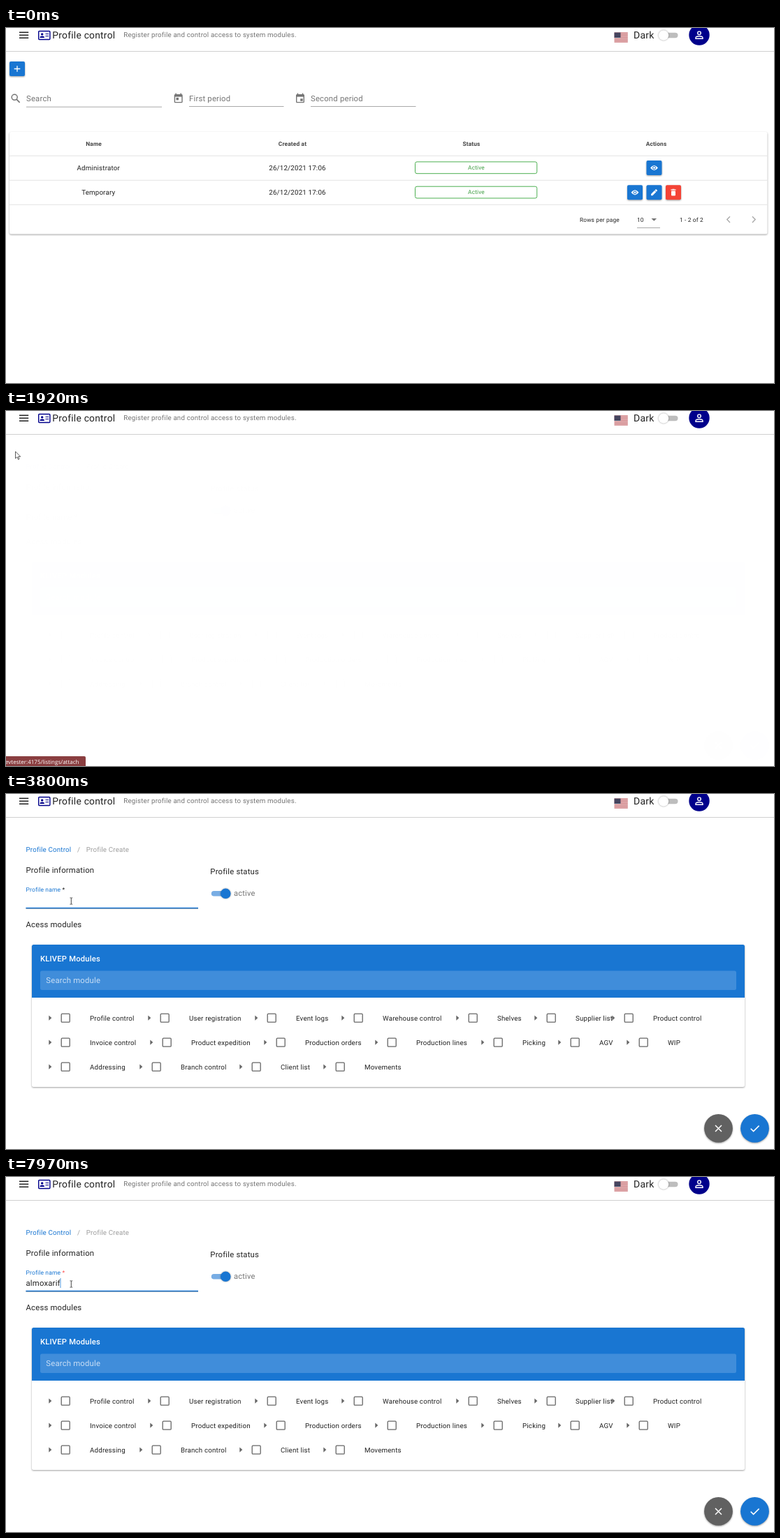
These frames come from a looping animation (1099 by 509 pixels, 8 s). An HTML page:

```html
<!DOCTYPE html>
<html lang="en">
<head>
<meta charset="utf-8">
<title>Profile control</title>
<style>
  html, body { margin: 0; width: 100%; height: 100%; overflow: hidden; background: #fff; }
  svg { display: block; font-family: Roboto, sans-serif; text-rendering: geometricPrecision; }
  text { letter-spacing: .018em; white-space: pre; }
  .card { filter: drop-shadow(0 1px 1.3px rgba(0, 0, 0, .38)); }
  .knob { filter: drop-shadow(0 .8px 1px rgba(0, 0, 0, .4)); }
</style>
</head>
<body>
<svg id="stage" width="1099" height="509" viewBox="0 0 1099 509"></svg>
<script>
const BLUE = '#1976d2', RED = '#f44336', NAVY = '#00008b', INK = '#222', GREY = '#757575';

// Drawing helpers
const text = (x, y, s, size = 9.76, fill = INK, more = '') =>
  `<text x="${x}" y="${y}" font-size="${size}" fill="${fill}" ${more}>${s}</text>`;
const mid = (x, y, s, size, fill, more = '') => text(x, y, s, size, fill, 'text-anchor="middle" ' + more);
const rect = (x, y, w, h, fill, r = 0, more = '') =>
  `<rect x="${x}" y="${y}" width="${w}" height="${h}" rx="${r}" fill="${fill}" ${more}/>`;
const disc = (x, y, r, fill, more = '') => `<circle cx="${x}" cy="${y}" r="${r}" fill="${fill}" ${more}/>`;
const stroke = (d, color, width = 1.4, more = '') =>
  `<path d="${d}" fill="none" stroke="${color}" stroke-width="${width}" ${more}/>`;
const rule = (x1, x2, y, color = '#949494', width = .8) => stroke(`M${x1} ${y}H${x2}`, color, width);
const at = (x, y, body, more = '') => `<g transform="translate(${x} ${y})" ${more}>${body}</g>`;
const group = (id, body) => `<g id="${id}">${body}</g>`;

const icons = {
  add: () => stroke('M-4.3 0H4.3M0-4.3V4.3', '#fff', 1.3),
  eye: bg => '<path d="M-5.5 0Q0-7.2 5.5 0Q0 7.2-5.5 0Z" fill="#fff"/>' + disc(0, 0, 2.4, bg) + disc(0, 0, 1.4, '#fff'),
  edit: bg => '<path d="M-4.4 4.4V2.2L2-4.2Q2.7-4.7 3.3-4.2L4.2-3.3Q4.7-2.7 4.2-2L-2.2 4.4Z" fill="#fff"/>' +
    stroke('M.4-3.5L3.5-.4', bg, .8),
  bin: () => rect(-3, -2.4, 6, 7, '#fff', .8) + rect(-3.6, -4.4, 7.2, 1.2, '#fff') + rect(-1.5, -5, 3, 1, '#fff')
};
const button = (x, y, icon, color = BLUE) =>
  at(x, y, rect(-11, -10.5, 22, 21, color, 2, 'class="card"') + icons[icon](color));

const calendar = (x, y, dot) => at(x, y,
  rect(-5.3, -4.7, 10.6, 10.8, 'none', .8, `stroke="${GREY}" stroke-width="1.4"`) +
  rect(-5.3, -4.7, 10.6, 2.8, GREY) + rect(-4.3, -7, 1.5, 2.5, GREY) + rect(2.8, -7, 1.5, 2.5, GREY) +
  rect(dot[0], dot[1], 3.5, 3.5, GREY));

const flag = () => {
  let out = rect(870.5, 6.5, 19.3, 14, '#f4eeee');
  for (let i = 0; i < 7; i++) out += rect(870.5, 6.5 + i * 2.15, 19.3, 1.1, '#c4575c');
  return out + rect(870.5, 6.5, 9, 7.5, '#45455f');
};

const header = () =>
  rule(0, 1099, 33.5, '#cfcfcf', 1) +
  stroke('M19 6.3H32.2M19 10.3H32.2M19 14.3H32.2', INK, 1.4) +
  rect(46.7, 4.5, 16.2, 12, 'none', 1, `stroke="${NAVY}" stroke-width="1.4"`) +
  disc(51.7, 8.9, 1.7, NAVY) + `<path d="M48.5 14Q48.5 11.6 51.7 11.6T54.9 14Z" fill="${NAVY}"/>` +
  stroke('M56.5 8.5H61M56.5 11.5H61', NAVY, 1.2) +
  text(66.3, 15, 'Profile control', 13.8) +
  text(168.3, 13.3, 'Register profile and control access to system modules.', 9.76, GREY) +
  flag() + text(898, 15.2, 'Dark', 14) +
  rect(937, 6.8, 24.5, 7.4, '#bdbdbd', 3.7) + disc(941, 10.5, 7.2, '#fff', 'class="knob"') +
  disc(992, 10, 14.7, NAVY) + disc(992, 7.2, 2.3, 'none', 'stroke="#fff" stroke-width="1.4"') +
  stroke('M987 15.2V14Q987 11.8 992 11.8T997 14V15.2Z', '#fff', 1.4);

const tableRow = (y, name) =>
  mid(132.2, y + 3.7, name) + mid(417, y + 3.7, '26/12/2021 17:06') +
  rect(585.5, y - 8.4, 174.3, 16.8, '#fff', 2.5, 'stroke="#4caf50"') +
  mid(673, y + 2.8, 'Active', 8.36, '#43a047');

const listPage = () =>
  button(16, 58.5, 'add') + group('glow', rect(5, 48, 22, 21, '#fff', 2)) +
  disc(12.2, 99.3, 4, 'none', `stroke="${GREY}" stroke-width="1.5"`) + stroke('M15 102.2L19.6 106.8', GREY, 1.7) +
  text(29, 105, 'Search', 11.3, GREY) + rule(29, 223, 113.2) +
  calendar(246.7, 100.5, [-3.2, -.6]) + text(262, 104.6, 'First period', 11.3, GREY) + rule(262, 397.5, 112.5) +
  calendar(421, 100.5, [.2, .8]) + text(436, 104.6, 'Second period', 11.3, GREY) + rule(436, 586.5, 112.5) +
  rect(5, 149, 1084.5, 146.5, '#fff', 2.5, 'class="card"') +
  rect(5, 183.5, 1084.5, 34.5, '#000', 0, 'id="hover1"') + rect(5, 218.5, 1084.5, 34.5, '#000', 0, 'id="hover2"') +
  [['Name', 125.7], ['Created at', 410], ['Status', 666], ['Actions', 930.5]]
    .map(([s, x]) => mid(x, 168.6, s, 8.36, '#444', 'font-weight="600"')).join('') +
  [183.3, 218.3, 253.3].map(y => rule(5, 1089.5, y, '#dedede')).join('') +
  tableRow(200.3, 'Administrator') + tableRow(235.6, 'Temporary') +
  button(927.5, 200.5, 'eye') + button(900, 235.8, 'eye') + button(927.5, 235.8, 'edit') + button(955, 235.8, 'bin', RED) +
  text(821, 277.7, 'Rows per page', 8.36) + text(903, 277.7, '10', 8.36) + rule(903, 936, 286.5) +
  `<path d="M923.5 273h7.6l-3.8 3.8Z" fill="${GREY}"/>` + text(964, 277.7, '1 - 2 of 2', 8.36) +
  stroke('M1036 270.3L1031.8 274.6L1036 278.9M1068 270.3L1072.2 274.6L1068 278.9', '#aaa', 1.4);

const modules = [
  [321, 'Profile control,User registration,Event logs,Warehouse control,Shelves,Supplier list,Product control',
    [63, 205, 358, 482, 646, 758, 869]],
  [356, 'Invoice control,Product expedition,Production orders,Production lines,Picking,AGV,WIP',
    [63, 208, 371, 530, 682, 792, 890]],
  [391, 'Addressing,Branch control,Client list,Movements', [63, 193, 336, 456]]
];
const moduleItem = (x, y, name) =>
  `<path d="M${x - 1.7} ${y - 3.6}l4 3.7l-4 3.7Z" fill="#666"/>` +
  rect(x + 16.2, y - 5.8, 12, 12, 'none', 1.2, 'stroke="#666" stroke-width="1.3"') + text(x + 57, y + 3.8, name);

const formPage = () =>
  text(28.5, 82.5, 'Profile Control', 9.76, BLUE) + text(102, 82.5, '/', 9.76, '#9e9e9e') +
  text(114.7, 82.5, 'Profile Create', 9.76, '#9e9e9e') +
  text(28.5, 112.8, 'Profile information', 11.3) + text(292.3, 114.8, 'Profile status', 11.3) +
  rect(293.8, 138.9, 24.5, 7.6, '#78ade4', 3.8) + disc(314.3, 142.8, 7.3, BLUE, 'class="knob"') +
  text(326, 146.3, 'active', 11.1, GREY) +
  `<text id="label" font-size="11.3">Profile name <tspan id="star">*</tspan></text>` +
  stroke('M28.5 164H275', '#949494', .8, 'id="line"') + stroke('M28.5 163.5H275', BLUE, 1.5, 'id="focusLine"') +
  text(28.5, 155.7, '', 11.3, INK, 'id="typed"') + rect(0, 145, .9, 14, BLUE, 0, 'id="caret"') +
  text(28.5, 176.6, 'Name must be minimal than 5 characters.', 8.36, '#ff5252', 'id="error"') +
  text(28.5, 190.6, 'Acess modules', 11.3) +
  rect(37, 216, 1020, 204, '#fff', 2.5, 'class="card"') +
  `<path d="M37 292V218.5a2.5 2.5 0 0 1 2.5-2.5H1054.5a2.5 2.5 0 0 1 2.5 2.5V292Z" fill="${BLUE}"/>` +
  text(49, 240.2, 'KLIVEP Modules', 11.2, '#fff', 'font-weight="500"') +
  rect(49, 253.5, 996, 27.5, '#fff', 2.5, 'opacity=".17"') +
  text(57.3, 271.3, 'Search module', 11.3, '#c8def5') +
  modules.map(([y, names, xs]) => names.split(',').map((s, i) => moduleItem(xs[i], y, s)).join('')).join('') +
  disc(1019.5, 479.4, 20.4, '#616161', 'class="card"') + stroke('M1015 475L1024 484M1024 475L1015 484', '#fff', 1.5) +
  disc(1071.5, 479.4, 20.4, BLUE, 'class="card"') + stroke('M1065.7 479.7L1069.6 483.6L1077.6 475.6', '#fff', 1.5);

stage.innerHTML = header() + group('list', listPage()) + group('form', formPage()) +
  group('tip', rect(0, 0, 82.5, 34.5, '#fff') + text(11.7, 21.5, 'Create profile', 9.6)) +
  group('status', '<path d="M0 495H112a2 2 0 0 1 2 2V509H0Z" fill="#8a3e40"/>' +
    text(-1, 506, 'evtester:4175/listings/attach', 8, '#fff', 'font-family="Open Sans, sans-serif" style="letter-spacing:0"')) +
  group('arrow', '<path d="M0 0V10L2.4 7.9 4 11.5 5.5 10.9 4 7.4H7.2Z" fill="#fff" stroke="#333" stroke-width=".8"/>') +
  group('hand', '<path d="M2.5.5Q3.7.5 3.7 1.7V5.3L7.6 6.3Q9 6.7 8.8 8.3L8.2 12.6H3L.3 8.4Q-.1 6.8 1.4 7.4V1.7Q1.4.5 2.5.5Z" fill="#fff" stroke="#222" stroke-width=".9"/>') +
  group('beam', stroke('M-1.8-4.6H-.5L0-4.2L.5-4.6H1.8M0-4.2V4.2M-1.8 4.6H-.5L0 4.2L.5 4.6H1.8', '#333', .9));

// Timing helpers
const $ = id => document.getElementById(id);
const ramp = (t, a, b) => Math.min(1, Math.max(0, (t - a) / (b - a)));
const ease = p => p * p * (3 - 2 * p);
const lerp = (a, b, p) => a + (b - a) * p;
const mix = (a, b, p) => a.map((v, i) => Math.round(lerp(v, b[i], p)));
const rgb = c => `rgb(${c})`;
const fade = (id, v) => { $(id).style.opacity = v; };
const move = (id, x, y) => $(id).setAttribute('transform', `translate(${x} ${y})`);

const grey = [117, 117, 117], dark = [34, 34, 34], blue = [25, 118, 210], red = [255, 82, 82];
const keyTimes = [5080, 5360, 5600, 5840, 6970, 7300, 7510, 7770, 7970];
const caretFlips = [3170, 3800, 4280, 4810, 5080, 6370, 6970];
const path = [[2200, 13.5, 58], [2540, 96, 172], [2670, 100.5, 174], [2880, 93.3, 153.5]];

function pointer(t) {
  if (t < 1100) {
    const p = ease(ramp(t, 240, 1090)), q = 1 - p;
    const curve = (a, b, c) => q * q * a + 2 * q * p * b + p * p * c;
    return [curve(600, 480, 13.5), curve(525, 120, 58)];
  }
  const i = Math.max(1, path.findIndex(k => k[0] > t));
  const [a, b] = t >= 2880 ? path.slice(-2) : [path[i - 1], path[i]];
  const p = ramp(t, a[0], b[0]);
  return [lerp(a[1], b[1], p), lerp(a[2], b[2], p)];
}

function draw(t) {
  const [x, y] = pointer(t);
  const onButton = t >= 1080 && t < 1780, inField = t > 2760;
  fade('arrow', !onButton && !inField ? 1 : 0);
  fade('hand', onButton ? 1 : 0);
  fade('beam', inField ? 1 : 0);
  move('arrow', x, y);
  move('hand', x - 2, y - .5);
  move('beam', x, y);

  fade('list', 1 - ramp(t, 1600, 1790));
  fade('glow', onButton ? .1 : 0);
  fade('hover1', t < 1100 && y > 183 && y < 218 ? .03 : 0);
  fade('hover2', t < 1100 && y > 218 && y < 253 ? .03 : 0);
  fade('tip', .94 * ramp(t, 1150, 1370) * (1 - ramp(t, 1600, 1780)));
  fade('status', t < 1990 ? ramp(t, 1270, 1450) : 0);
  fade('form', ramp(t, 1920, 2060));

  const focus = ease(ramp(t, 3140, 3520));
  const wrong = (length, back) => ramp(t, 5080, 5080 + length) * (1 - ramp(t, 6970, 6970 + back));
  const labelColor = rgb(mix(mix(grey, blue, focus), red, wrong(170, 360)));
  $('label').setAttribute('transform', `translate(28.5 ${lerp(155.7, 140, focus)}) scale(${lerp(1, .75, focus)})`);
  $('label').setAttribute('fill', labelColor);
  $('star').setAttribute('fill', rgb(mix(dark, red, ramp(t, 5220, 5440))));
  $('line').setAttribute('stroke', inField ? '#333' : '#949494');
  $('focusLine').setAttribute('stroke', rgb(mix(blue, red, wrong(360, 360))));
  $('focusLine').setAttribute('transform', `translate(${151.75 * (1 - focus)} 0) scale(${focus} 1)`);
  fade('focusLine', focus > 0 ? 1 : 0);
  fade('error', wrong(130, 300));

  $('typed').textContent = 'almoxarif'.slice(0, keyTimes.filter(k => k <= t).length);
  $('caret').setAttribute('x', 28.3 + $('typed').getComputedTextLength());
  $('caret').setAttribute('fill', labelColor);
  fade('caret', caretFlips.filter(k => k <= t).length % 2 ? .85 : 0);
}

const start = performance.now();
function loop() {
  draw((performance.now() - start) % 8000);
  requestAnimationFrame(loop);
}
loop();
</script>
</body>
</html>
```
